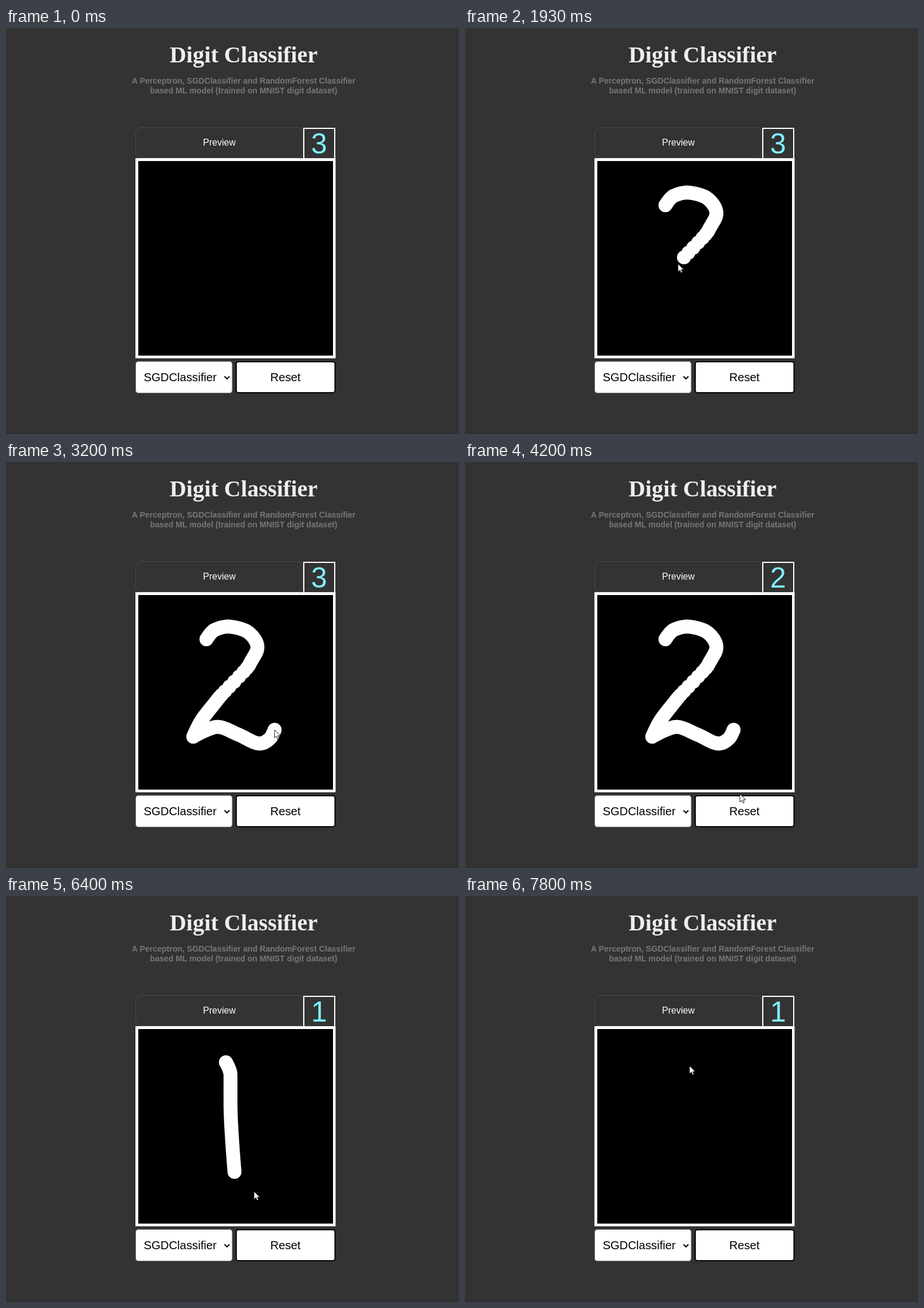
Recreate the animation shown at these times as an HTML page. Size 791x708 px, loop 8000 ms.

```html
<!DOCTYPE html>
<html lang="en">
<head>
<meta charset="utf-8">
<title>Digit Classifier</title>
<style>
  html, body { margin: 0; width: 100%; height: 100%; overflow: hidden; background: #333; }
  svg { display: block; width: 100%; height: 100%; }
  text { font-family: "Liberation Sans", Arial, sans-serif; text-anchor: middle; }
  .title { font: bold 40.3px "Liberation Serif", "Times New Roman", serif; fill: #eee; }
  .subtitle { font-weight: bold; font-size: 14.13px; fill: #777; }
  .preview { font-size: 16px; fill: #fff; }
  .digit { font-size: 50px; fill: #80f0ff; }
  .control { font-size: 20.3px; fill: #000; }
</style>
</head>
<body>
<svg viewBox="0 0 791 708">
  <rect width="791" height="708" fill="#333"/>
  <rect y="706" width="791" height="2" fill="#2e2e2e"/>
  <text class="title" x="415" y="60">Digit Classifier</text>
  <text class="subtitle" x="415" y="97">A Perceptron, SGDClassifier and RandomForest Classifier</text>
  <text class="subtitle" x="415" y="114">based ML model (trained on MNIST digit dataset)</text>

  <rect x="226.5" y="173.5" width="292" height="53" rx="10" fill="none" stroke="#4c4c4c"/>
  <text class="preview" x="372.5" y="205">Preview</text>
  <rect x="520" y="175" width="54" height="54" fill="#333" stroke="#fff" stroke-width="2"/>
  <text class="digit" id="digit" x="546.7" y="219.3"></text>

  <rect x="226" y="227" width="349.5" height="349" fill="#fff"/>
  <rect x="231" y="232" width="340" height="339.3"/>
  <path id="ink" fill="none" stroke="#fff" stroke-width="24.4" stroke-linecap="round"/>

  <rect x="226.5" y="581.5" width="168.5" height="55" rx="4.5" fill="#fff" stroke="#767676"/>
  <text class="control" x="304.2" y="616">SGDClassifier</text>
  <path d="M381.5 607.5l4.3 4.3 4.3-4.3" fill="none" stroke="#000" stroke-width="2"/>
  <rect id="reset" x="402" y="582" width="172.5" height="54" rx="4" stroke="#000" stroke-width="2"/>
  <text class="control" x="488" y="616">Reset</text>

  <path id="cursor" d="M0 0V14.2L3.3 11.2 5.4 16 7.8 15 5.7 10.3H10.1Z" fill="#fff" stroke="#000" stroke-width=".9"/>
</svg>
<script>
const LOOP = 8000, FPS = 15;
const INK_LAG = 15, STAMP_EVERY = 8;

// Pointer track: time, x, y
const track = [
  [133, 780, 692], [533, 480, 350], [800, 360, 271], [970, 350, 309], [1030, 350, 309],
  [1200, 364, 293], [1350, 388, 287], [1500, 420, 295], [1700, 439, 323], [1867, 424, 355],
  [1933, 372, 411], [2170, 338, 456], [2330, 327, 479], [2533, 369, 462], [2733, 405, 475],
  [2933, 443, 491], [3070, 461, 482], [3180, 469, 467], [3270, 469, 467], [3667, 476, 497],
  [3933, 476, 497], [4310, 481, 600], [4500, 481, 600], [4800, 393, 369], [5067, 385, 292],
  [5200, 384, 290], [5280, 384, 290], [5400, 392, 312], [5600, 392, 362], [6050, 399, 481],
  [6267, 399, 481], [6400, 433, 515], [6800, 486, 598], [7133, 486, 598], [7533, 410, 370],
  [7800, 392, 296]
];
const strokes = [
  { start: 980, end: 3200, cleared: 4460 },
  { start: 5248, end: 6060, cleared: 7060 }
];

const [digit, ink, reset, cursor] =
  ["digit", "ink", "reset", "cursor"].map(id => document.getElementById(id));

// Monotone cubic interpolation: smooth between keys, without overshoot
function slope(i, axis) {
  const [a, b] = [track[i], track[i + 1]];
  return a && b ? (b[axis] - a[axis]) / (b[0] - a[0]) : 0;
}

function tangent(i, axis) {
  const before = slope(i - 1, axis), after = slope(i, axis);
  return before * after > 0 ? 2 * before * after / (before + after) : 0;
}

function pointerAt(t) {
  const found = track.findIndex(key => key[0] >= t);
  const next = found < 0 ? track.length - 1 : Math.max(1, found);
  const a = track[next - 1], b = track[next], span = b[0] - a[0];
  const p = Math.min(1, Math.max(0, (t - a[0]) / span)), q = 1 - p;
  return [1, 2].map(axis =>
    a[axis] * q * q * (1 + 2 * p) + b[axis] * p * p * (1 + 2 * q) +
    span * p * q * (tangent(next - 1, axis) * q - tangent(next, axis) * p));
}

// Round brush stamps along the pointer track
function inkAt(t) {
  const stroke = strokes.find(s => t >= s.start && t < s.cleared);
  if (!stroke) return "";
  let d = "";
  for (let s = stroke.start; s <= Math.min(t - INK_LAG, stroke.end); s += STAMP_EVERY) {
    d += "M" + pointerAt(s).map(v => v.toFixed(1)).join(" ") + "h0";
  }
  return d;
}

function labelAt(t) {
  if (t < 3530) return "3";
  if (t < 3600) return "";
  return t < 6130 ? "2" : "1";
}

function render(t) {
  const [x, y] = pointerAt(t);
  const hovered = x > 401 && x < 575 && y > 581 && y < 637;
  cursor.setAttribute("transform", `translate(${x} ${y})`);
  cursor.setAttribute("visibility", t < track[0][0] ? "hidden" : "visible");
  reset.setAttribute("fill", hovered ? "#e5e5e5" : "#fff");
  ink.setAttribute("d", inkAt(t));
  digit.textContent = labelAt(t);
}

const began = performance.now();
function tick() {
  const t = (performance.now() - began) % LOOP;
  render(Math.floor(t * FPS / 1000 + 0.1) * 1000 / FPS % LOOP);
  requestAnimationFrame(tick);
}
tick();
</script>
</body>
</html>
```
